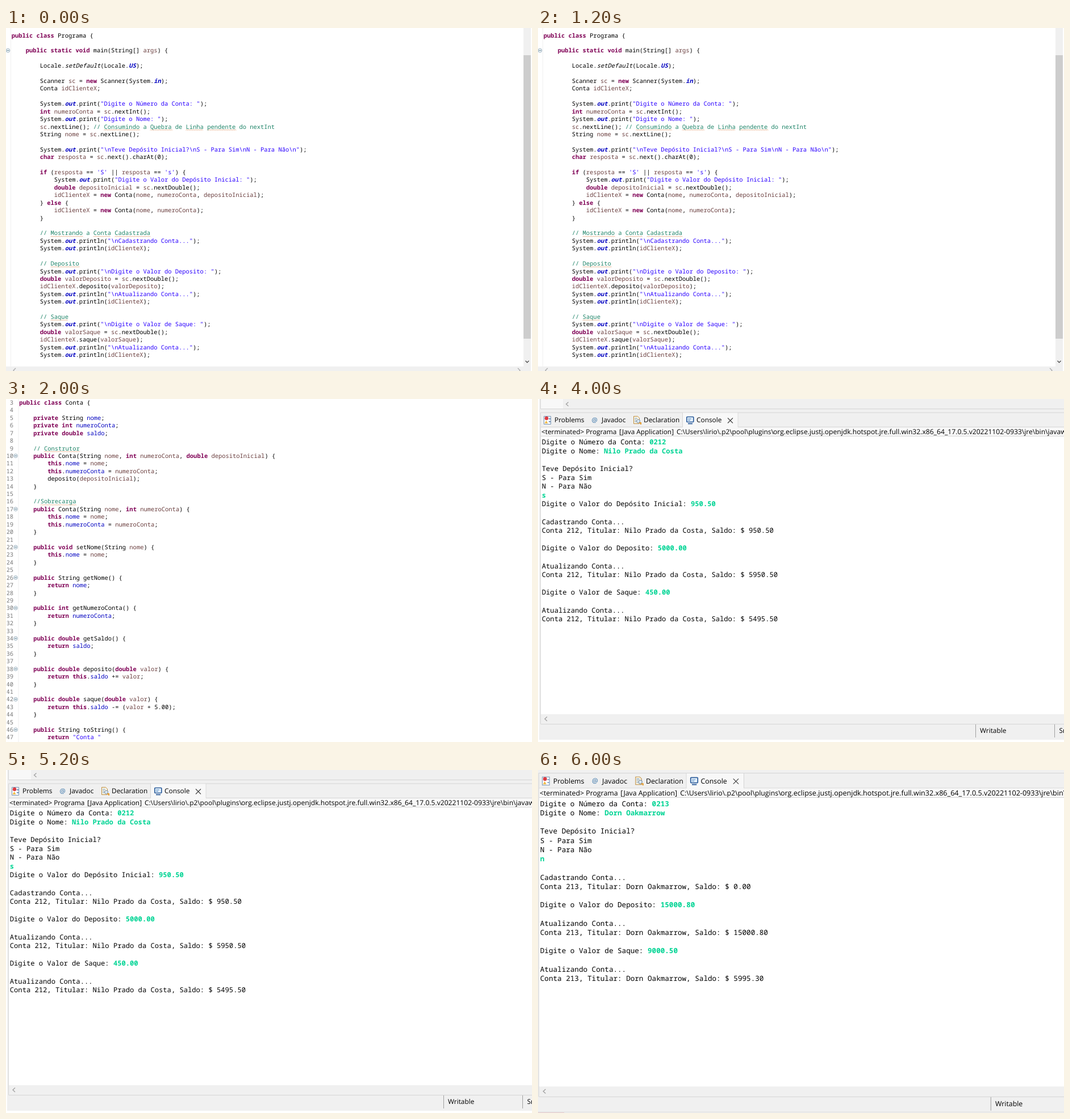
Write an HTML page that moves like this. It is 926 by 605 pixels and loops after 8 s.

```html
<!DOCTYPE html>
<html lang="pt">
<head>
<meta charset="utf-8">
<style>
html, body { margin: 0; width: 100%; height: 100%; overflow: hidden; background: #fff; }
svg { display: block; }
text { white-space: pre; text-rendering: geometricPrecision; }
.code { font: 10.44px "Noto Sans Mono", "DejaVu Sans Mono", monospace; }
.term { font: 500 12.15px "Noto Sans Mono", "DejaVu Sans Mono", monospace; }
.ui { font: 11.85px "Open Sans", "Noto Sans", sans-serif; }
.path { font-size: 12.12px; }
.key { fill: #7f0055; font-weight: bold; }
.str { fill: #2a00ff; }
.com { fill: #1f8468; }
.field { fill: #0000c0; }
.stat { fill: #0000c0; font-weight: bold; font-style: italic; }
.ital { font-style: italic; }
.loc { fill: #6a3e3e; }
.num { fill: #787878; text-anchor: end; }
.in { fill: #00d494; font-weight: 600; }
</style>
</head>
<body>
<svg id="stage" width="926" height="605" viewBox="0 0 926 605"></svg>
<script>
const mainCode = String.raw`public class Programa {

    public static void main(String[] args) {

        Locale.setDefault(Locale.US);

        Scanner sc = new Scanner(System.in);
        Conta idClienteX;

        System.out.print("Digite o Número da Conta: ");
        int numeroConta = sc.nextInt();
        System.out.print("Digite o Nome: ");
        sc.nextLine(); // Consumindo a Quebra de Linha pendente do nextInt
        String nome = sc.nextLine();

        System.out.print("\nTeve Depósito Inicial?\nS - Para Sim\nN - Para Não\n");
        char resposta = sc.next().charAt(0);

        if (resposta == 'S' || resposta == 's') {
            System.out.print("Digite o Valor do Depósito Inicial: ");
            double depositoInicial = sc.nextDouble();
            idClienteX = new Conta(nome, numeroConta, depositoInicial);
        } else {
            idClienteX = new Conta(nome, numeroConta);
        }

        // Mostrando a Conta Cadastrada
        System.out.println("\nCadastrando Conta...");
        System.out.println(idClienteX);

        // Deposito
        System.out.print("\nDigite o Valor do Deposito: ");
        double valorDeposito = sc.nextDouble();
        idClienteX.deposito(valorDeposito);
        System.out.println("\nAtualizando Conta...");
        System.out.println(idClienteX);

        // Saque
        System.out.print("\nDigite o Valor de Saque: ");
        double valorSaque = sc.nextDouble();
        idClienteX.saque(valorSaque);
        System.out.println("\nAtualizando Conta...");
        System.out.println(idClienteX);`;

const classCode = `public class Conta {

    private String nome;
    private int numeroConta;
    private double saldo;

    // Construtor
    public Conta(String nome, int numeroConta, double depositoInicial) {
        this.nome = nome;
        this.numeroConta = numeroConta;
        deposito(depositoInicial);
    }

    //Sobrecarga
    public Conta(String nome, int numeroConta) {
        this.nome = nome;
        this.numeroConta = numeroConta;
    }

    public void setNome(String nome) {
        this.nome = nome;
    }

    public String getNome() {
        return nome;
    }

    public int getNumeroConta() {
        return numeroConta;
    }

    public double getSaldo() {
        return saldo;
    }

    public double deposito(double valor) {
        return this.saldo += valor;
    }

    public double saque(double valor) {
        return this.saldo -= (valor + 5.00);
    }

    public String toString() {
        return "Conta "`;

// Console lines; the part after "|" was typed by the user.
const firstRun = `Digite o Número da Conta: |0212
Digite o Nome: |Nilo Prado da Costa

Teve Depósito Inicial?
S - Para Sim
N - Para Não
|s
Digite o Valor do Depósito Inicial: |950.50

Cadastrando Conta...
Conta 212, Titular: Nilo Prado da Costa, Saldo: $ 950.50

Digite o Valor do Deposito: |5000.00

Atualizando Conta...
Conta 212, Titular: Nilo Prado da Costa, Saldo: $ 5950.50

Digite o Valor de Saque: |450.00

Atualizando Conta...
Conta 212, Titular: Nilo Prado da Costa, Saldo: $ 5495.50`;

const secondRun = `Digite o Número da Conta: |0213
Digite o Nome: |Dorn Oakmarrow

Teve Depósito Inicial?
S - Para Sim
N - Para Não
|n

Cadastrando Conta...
Conta 213, Titular: Dorn Oakmarrow, Saldo: $ 0.00

Digite o Valor do Deposito: |15000.80

Atualizando Conta...
Conta 213, Titular: Dorn Oakmarrow, Saldo: $ 15000.80

Digite o Valor de Saque: |9000.50

Atualizando Conta...
Conta 213, Titular: Dorn Oakmarrow, Saldo: $ 5995.30`;

const syntax = new RegExp([
  /(?<com>\/\/.*)/,
  /(?<str>"[^"]*"|'.')/,
  /(?<key>\b(?:public|private|class|static|void|new|int|double|char|if|else|this|return)\b)/,
  /(?<field>(?<=this\.|private \w+ |return )(?:nome|numeroConta|saldo)\b)/,
  /(?<stat>\b(?:out|in|US)\b)/,
  /(?<ital>setDefault)/,
  /(?<loc>\b(?:args|sc|idClienteX|numeroConta|nome|resposta|depositoInicial|valor(?:Deposito|Saque)?)\b)/
].map(r => r.source).join("|"), "g");

const rect = (x, y, w, h, fill) => `<rect x="${x}" y="${y}" width="${w}" height="${h}" fill="${fill}"/>`;
const path = (d, stroke, width = 1) => `<path d="${d}" fill="none" stroke="${stroke}" stroke-width="${width}"/>`;
const text = (x, y, cls, s) => `<text x="${x}" y="${y}" class="${cls}">${s}</text>`;
const span = (cls, s) => `<tspan class="${cls}">${s}</tspan>`;
const escape = s => s.replace(/</g, "&lt;");

function highlight(line) {
  return line.replace(syntax, (...m) => {
    const [cls] = Object.entries(m.at(-1)).find(([, v]) => v !== undefined);
    return span(cls, m[0]);
  });
}

// Spell-check marks under the longer words of a comment.
function squiggles(line, x, y) {
  const start = line.indexOf("//");
  if (start < 0) return "";
  return [...line.slice(start).matchAll(/[A-Za-z]{5,}/g)]
    .filter(m => m[0] !== "nextInt")
    .map(m => {
      const waves = Math.round(m[0].length * 6.264 / 3);
      return path(`M${x + (start + m.index) * 6.264} ${y + 3}` + "l1.5 -1.5l1.5 1.5".repeat(waves), "#e5a277", .8);
    }).join("");
}

const fold = (x, y) =>
  `<circle cx="${x}" cy="${y}" r="3.3" fill="#f4f8fa" stroke="#91a9b8" stroke-width=".9"/>` +
  path(`M${x - 2} ${y}h4`, "#50788c");

function editor(source, x, top, firstNumber) {
  return rect(x - 1.7, 0, 1, 605, "#f0f0f0") + source.split("\n").map((line, i) => {
    const y = top + i * 13.42;
    return (firstNumber ? text(13, y, "code num", firstNumber + i) : "") +
      (/^    public/.test(line) ? fold(x - 6.2, y - 3.7) : "") +
      squiggles(line, x, y) + text(x, y, "code", highlight(line));
  }).join("");
}

function mainView() {
  return editor(mainCode, 9.7, 16.5) +
    rect(911, 0, 13, 597, "#f0f0f0") + rect(911, 48, 13, 500, "#cdcdcd") +
    path("M914.5 587l3 3l3 -3", "#505050", 1.4) +
    rect(0, 597, 924, 8, "#f0f0f0") +
    path("M17 600l-4 4l3 3M901 600l4 4l-3 3", "#a8a8a8", 1.3);
}

function classView() {
  return editor(classCode, 23.2, 10, 3) + rect(0, 0, 1.7, 605, "#fff");
}

const icons =
  // problems
  rect(10.5, 30.5, 12, 14, "#fff") + path("M10.5 30.5h12v14h-12z", "#7593b5") +
  '<circle cx="15" cy="34" r="3.3" fill="#dc3b43"/>' +
  '<path d="M11.5 43l3-5l3 5z" fill="#efb944"/>' + path("M19 35h3M19 40h3", "#4f78ad", 1.3) +
  // declaration
  rect(168.5, 30.5, 9, 13, "#fff8e5") + path("M168.5 30.5h7l3 3v10h-10z", "#b98b42") +
  path("M170 34h5M170 37h3M170 40h3", "#628bbd") +
  '<circle cx="176.5" cy="39" r="3" fill="#dceaf5" stroke="#73879b"/>' + path("M178 42h3v3", "#e29b2f", 2) +
  // console
  '<rect x="261.8" y="31.5" width="12" height="9" rx="1" fill="#e8f3fc" stroke="#2e5e9c" stroke-width="1.7"/>' +
  path("M264 35h6M264 37.5h4", "#4c83bf") + path("M264 43.5h8", "#2e5e9c", 1.8);

function consoleView(log) {
  const line = "#d5d5d5";
  const label = [
    [6, "<terminated> Programa"], [143, "[Java Application]"],
    [244, "C:\\Users\\lirio\\.p2\\pool\\plugins\\"]
  ];
  const runtime = "org.eclipse.justj.openjdk.hotspot.jre.full.win32.x86_64_17.0.5.v20221102-0933\\jre\\bin\\javaw.exe";
  const tabs = [[29, "Problems"], [112, "Javadoc"], [186, "Declaration"], [279, "Console"]];
  return rect(2, 0, 924, 601, "#f0f0f0") +
    rect(5, 0, 39, 17, "#f8f8f8") + path("M53.5 5.5l-4 3.5l4 3.5", "#a0a0a0", 1.3) +
    path("M4.5 0V17.5H926M4.5 573V24H926M4.5 49.5H254.5V24M352 24V49.5H926", line) +
    rect(255, 24.5, 96.5, 26, "#f8f8f8") + rect(5, 50, 921, 16, "#f8f8f8") +
    icons + text(94.5, 41, "ui", '<tspan fill="#2e6da4" font-size="11.5">@</tspan>') +
    tabs.map(([x, s]) => text(x, 41.4, "ui", s)).join("") +
    path("M334 33.5l9 9m0 -9l-9 9", "#404040", 1.1) +
    label.map(([x, s]) => text(x, 62.3, "ui", escape(s))).join("") +
    text(414, 62.3, "ui path", runtime) +
    rect(5, 66, 921, 490, "#fff") + path("M5 65.5H926", line) +
    log.split("\n").map((s, i) => {
      const [out, typed = ""] = s.split("|");
      return text(6.8, 80.2 + i * 15.6, "term", out + span("in", typed));
    }).join("") +
    path("M16 560.5l-4 3.7l4 3.7", "#a0a0a0", 1.3) +
    path("M4.5 573.5H926", line) + path("M770.5 574v23M909.5 574v23", "#a0a0a0") +
    text(778, 589.3, "ui", "Writable") + text(917.5, 589.3, "ui", "Smart Insert");
}

const views = [
  mainView(),
  classView(),
  consoleView(firstRun),
  `<g transform="translate(-3.27 -19.46) scale(1.039)">${consoleView(secondRun)}</g>` +
    rect(0, 603, 926, 1, "#d8d8d8") + rect(0, 604, 926, 1, "#f8f8f8") + rect(0, 604, 46, 1, "#f3d5d5")
];
const stage = document.getElementById("stage");
stage.innerHTML = views.map(v => `<g display="none">${v}</g>`).join("");

function draw() {
  const current = Math.floor(performance.now() % 8000 / 2000);
  [...stage.children].forEach((g, i) => g.setAttribute("display", i === current ? "inline" : "none"));
  requestAnimationFrame(draw);
}
draw();
</script>
</body>
</html>
```
